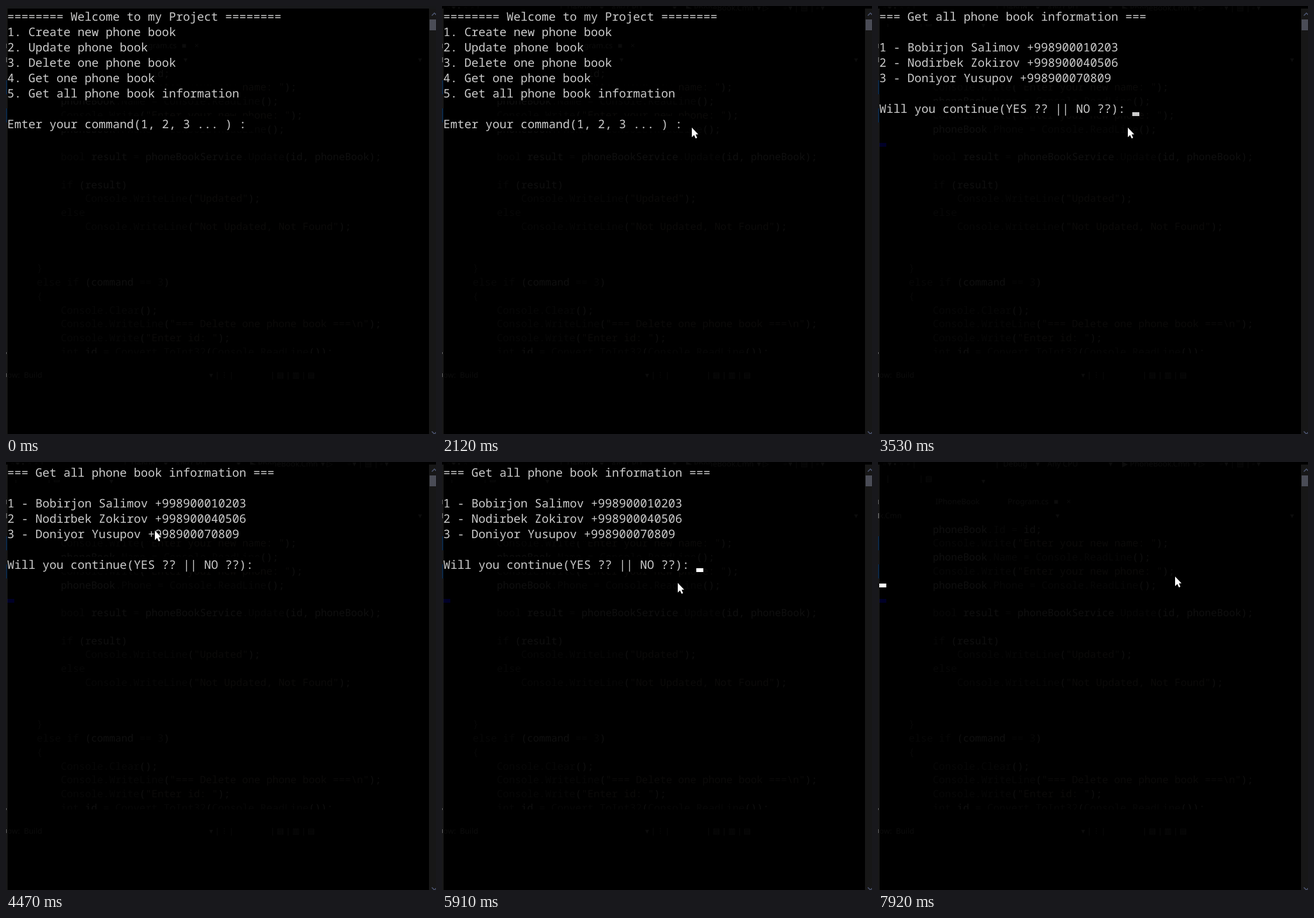
An HTML page for the animation above (7990 ms loop, 673 by 669 pixels).

```html
<!DOCTYPE html>
<html lang="en">
<head>
<meta charset="utf-8">
<title>Phone book console</title>
<style>
  html, body { margin: 0; width: 100%; height: 100%; overflow: hidden; background: #000; }
  svg { display: block; width: 100%; height: 100%; }
  text { white-space: pre; text-rendering: geometricPrecision; }
  .con text { font: 18.333px "Noto Sans Mono", "DejaVu Sans Mono", monospace; fill: #ccc; }
  .code { font: 15.77px "Noto Sans Mono", "DejaVu Sans Mono", monospace; fill: #070707; }
  .code .hi { fill: #0f0f0f; }
  .code .str { fill: #0b0a09; }
  .ui { font: 12px "Noto Sans", "Open Sans", sans-serif; fill: #0c0c0c; }
</style>
</head>
<body>
<svg id="stage" viewBox="0 0 673 669">
  <rect width="673" height="669" fill="#000"/>
  <g id="ide"></g>
  <g id="toolbar" class="ui"></g>
  <rect id="strip" width="673" height="4" fill="#17181a"/>
  <rect y="4" width="1" height="665" fill="#0a0a0a"/>
  <rect x="1" y="4" width="1" height="665" fill="#2c2c2c"/>
  <path d="M0 116h2v22h-2zM0 160h2v22h-2z" fill="#0b2745"/>
  <path d="M0 59h1v7h-1zM0 80h2v8h-2zM0 541h1v3h-1zM0 574h1v6h-1z" fill="#555"/>
  <rect x="662" y="4" width="11" height="665" fill="#171717"/>
  <rect x="663" y="21" width="10" height="17" fill="#4a4c56"/>
  <path d="M666.500 15l4-4 4 4M666.500 665l4 4 4-4" fill="none" stroke="#4d5672" stroke-width="1.500"/>
  <rect id="trace" x="2" y="214" width="11" height="6" fill="#000028"/>
  <g id="menu" class="con"></g>
  <g id="list" class="con"></g>
  <g id="typed" class="con"><rect height="24" fill="#000"/><text></text></g>
  <rect id="caret" width="11" height="6"/>
  <path id="mouse" d="M1 1V16L4.500 12.800 7 18 9.300 17 7 11.800 11 11.500Z"
        fill="#fff" stroke="#000" stroke-width="1.500" paint-order="stroke"/>
</svg>
<script>
const LOOP = 7990, TICK = 66.6, CELL = 11, ROW = 24;
const $ = id => document.getElementById(id);

function add(parent, tag, attrs, text = "") {
  const el = document.createElementNS("http://www.w3.org/2000/svg", tag);
  for (const k in attrs) el.setAttribute(k, attrs[k]);
  el.textContent = text;
  return parent.appendChild(el);
}

// Code seen faintly through the window: [line, indent, text]
const code = [
  [0, 4, 'phoneBook.Id = id;'],
  [1, 4, 'Console.Write("Enter your new name: ");'],
  [2, 4, 'phoneBook.Name = Console.ReadLine();'],
  [3, 4, 'Console.Write("Enter your new phone: ");'],
  [4, 4, 'phoneBook.Phone = Console.ReadLine();'],
  [6, 4, 'bool result = phoneBookService.Update(id, phoneBook);'],
  [8, 4, 'if (result)'],
  [9, 8, 'Console.WriteLine("Updated");'],
  [10, 4, 'else'],
  [11, 8, 'Console.WriteLine("Not Updated, Not Found");'],
  [14, 0, '}'],
  [15, 0, 'else if (command == 3)'],
  [16, 0, '{'],
  [17, 4, 'Console.Clear();'],
  [18, 4, 'Console.WriteLine("=== Delete one phone book ===\\n");'],
  [19, 4, 'Console.Write("Enter id: ");'],
  [20, 4, 'int id = Convert.ToInt32(Console.ReadLine());']
];
const token = /("[^"]*"|\b(?:phoneBookService|phoneBook|id|result|command)\b|[();,])/;
for (const [line, indent, src] of code) {
  const el = add($("ide"), "text", { class: "code", x: 48 + indent * 9.46, y: 110.5 + line * 21.77 });
  src.split(token).forEach((part, i) => {
    const kind = i % 2 ? (part[0] === '"' ? "str" : "hi") : "dim";
    add(el, "tspan", { class: kind }, part);
  });
}
add($("ide"), "rect", { x: 2, y: 543, width: 660, height: 12, fill: "#000" });

function labels(parent, list) {
  for (const [x, y, s] of list) add(parent, "text", { class: "ui", x, y }, s);
}
labels($("ide"), [
  [90, 66, "IPhoneBook"], [203, 66, "Program.cs"], [275, 66, "■"], [295, 66, "×"],
  [2, 88, "k.Cmn"], [278, 88, "▾"], [645, 88, "▾"], [12, 30, "|"], [64, 30, "| ▤"], [162, 34, "▾"],
  [2, 581, "ow:  Build"], [318, 581, "▾ |  ⁝  |"], [414, 581, "| ▤ | ▥ | ▤"]
]);
labels($("toolbar"), [
  [8, 7, "▫ ▾ ▪  ▫  ▫ |"], [183, 7, "|  Debug"], [247, 7, "▾"], [265, 7, "Any CPU"], [361, 7, "▾"],
  [382, 7, "▶ PhoneBook.Cmn"], [493, 7, "▾ ▷"], [535, 7, "▫ ▾ | ▤ | ▫ ▾"]
]);

function screen(parent, rows) {
  rows.forEach((s, i) => {
    if (!s) return;
    add(parent, "rect", { x: 2, y: 4 + ROW * i, width: s.length * CELL, height: ROW, fill: "#000" });
    add(parent, "text", { x: 2, y: 23 + ROW * i }, s);
  });
}
screen($("menu"), [
  "======== Welcome to my Project ========",
  "1. Create new phone book",
  "2. Update phone book",
  "3. Delete one phone book",
  "4. Get one phone book",
  "5. Get all phone book information",
  "",
  "Emter your command(1, 2, 3 ... ) : "
]);
screen($("list"), [
  "=== Get all phone book information ===",
  "",
  "1 - Bobirjon Salimov +998900010203",
  "2 - Nodirbek Zokirov +998900040506",
  "3 - Doniyor Yusupov +998900070809",
  "",
  "Will you continue(YES ?? || NO ??): "
]);

// [time, screen, typed text]
const states = [
  [0, "menu", ""], [3130, "menu", "5"], [3460, "", ""], [3530, "list", ""],
  [7120, "list", "y"], [7260, "list", "ye"], [7590, "list", "yes"], [7920, "", ""]
];
// [time, column, row, colour]; no colour hides the caret
const carets = [
  [0, 35, 7], [1590, 35, 7, "#fff"], [2120, 35, 7], [2650, 35, 7, "#fff"], [3130, 36, 7, "#fff"],
  [3460, 0, 8, "#fff"], [3530, 36, 6, "#ccc"], [4270, 36, 6], [4800, 36, 6, "#fff"],
  [5330, 36, 6], [5860, 36, 6, "#fff"], [6390, 36, 6], [6920, 36, 6, "#fff"],
  [7120, 37, 6, "#fff"], [7260, 38, 6, "#fff"], [7455, 38, 6], [7590, 39, 6, "#fff"],
  [7850, 0, 7, "#fff"]
];
// [time, x, y] of the pointer tip
const path = [
  [120, 587, 612], [260, 545, 490], [400, 470, 320], [530, 412, 205], [660, 383, 150], [730, 377, 141],
  [860, 386, 170], [990, 386, 170], [1130, 390, 189],
  [4120, 390, 189], [4260, 345, 165], [4400, 265, 120], [4540, 190, 88], [4680, 150, 84], [4810, 160, 92],
  [4950, 174, 74], [5080, 178, 67], [5220, 160, 25], [5340, 150, 3], [5480, 180, 40], [5640, 265, 125],
  [5840, 362, 188], [5980, 405, 191], [6190, 464, 178]
];

const last = (table, t) => table.findLast(row => row[0] <= t);

function pointer(t) {
  const next = path.findIndex(p => p[0] > t);
  if (next < 0) return path.at(-1).slice(1);
  const a = path[Math.max(next - 1, 0)], b = path[next];
  const k = a === b ? 0 : (t - a[0]) / (b[0] - a[0]);
  return [1, 2].map(i => Math.round(a[i] + (b[i] - a[i]) * k));
}

const show = (id, on) => $(id).setAttribute("visibility", on ? "visible" : "hidden");

function draw(t) {
  const [, name, typed] = last(states, t);
  show("menu", name === "menu");
  show("list", name === "list");
  show("strip", t < 1460);
  show("toolbar", t >= 1460);
  show("trace", t >= 3460);

  const [col, row] = name === "menu" ? [35, 7] : [36, 6];
  const [back, text] = $("typed").children;
  const x = 2 + col * CELL, y = 4 + row * ROW;
  back.setAttribute("x", x);
  back.setAttribute("y", y);
  back.setAttribute("width", typed.length * CELL);
  text.setAttribute("x", x);
  text.setAttribute("y", y + 19);
  text.textContent = typed;

  const [, cc, cr, colour] = last(carets, t);
  show("caret", colour);
  $("caret").setAttribute("x", 2 + cc * CELL);
  $("caret").setAttribute("y", 22 + cr * ROW);
  $("caret").setAttribute("fill", colour || "none");

  const [mx, my] = pointer(Math.floor((t + 14) / TICK) * TICK);
  show("mouse", t >= 120);
  $("mouse").setAttribute("transform", `translate(${mx} ${my})`);
}

const start = performance.now();
function frame() {
  draw((performance.now() - start) % LOOP);
  requestAnimationFrame(frame);
}
frame();
</script>
</body>
</html>
```
